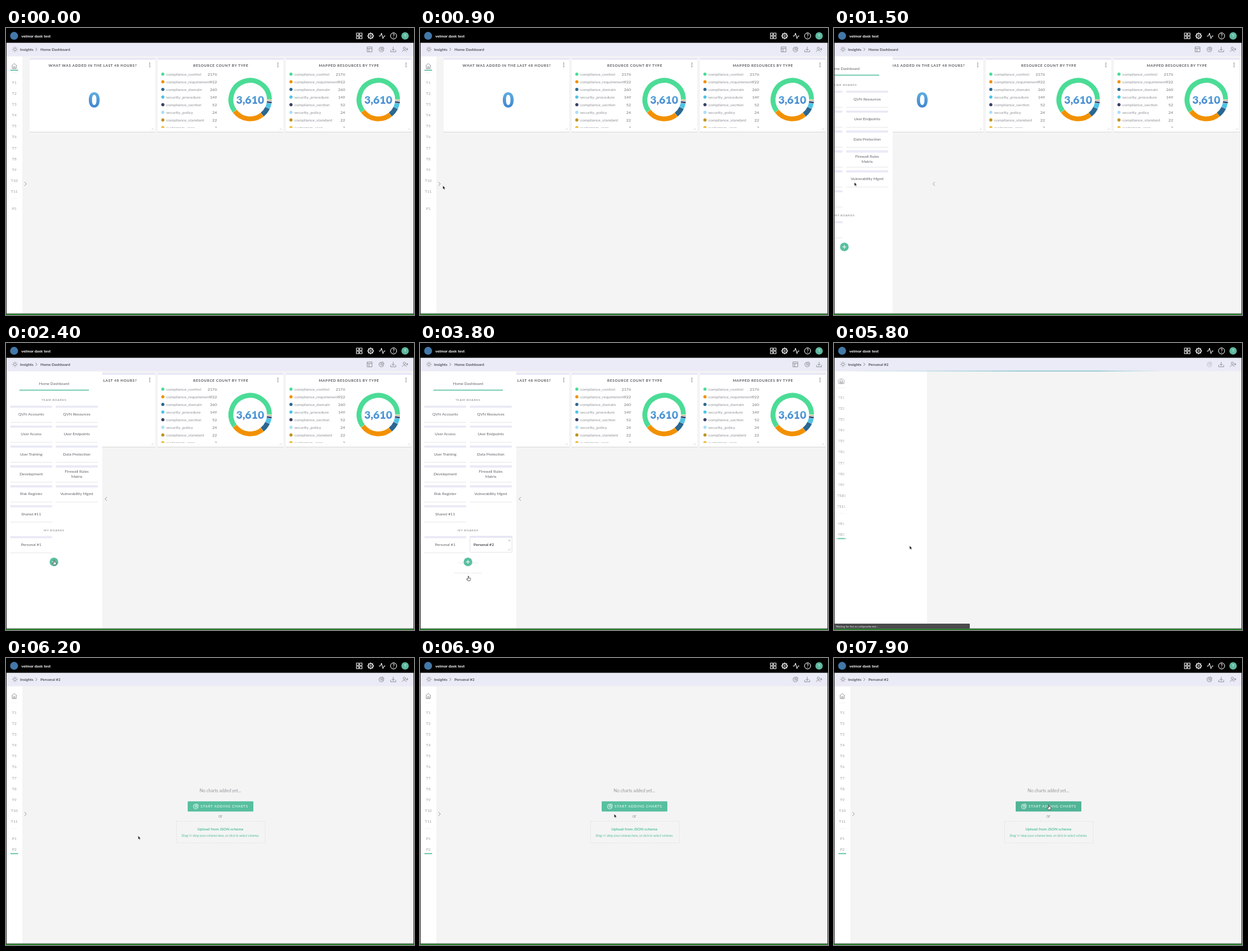
An HTML page that plays this animation: 640 by 451 pixels, repeating every 8000 ms.

```html
<!DOCTYPE html>
<html lang="en">
<head>
<meta charset="utf-8">
<title>Dashboard boards</title>
<style>
html, body { margin: 0; width: 100%; height: 100%; overflow: hidden; background: #f4f4f4; }
svg { display: block; width: 640px; height: 451px; }
text { font-family: Lato, "Open Sans", sans-serif; }
</style>
</head>
<body>
<svg id="stage" viewBox="0 0 640 451" xmlns="http://www.w3.org/2000/svg"></svg>
<script>
const stage = document.getElementById('stage');
const TEAL = '#57bf9f';

// ---- markup helpers ----
const rect = (x, y, w, h, fill, more = '') =>
  `<rect x="${x}" y="${y}" width="${w}" height="${h}" fill="${fill}" ${more}/>`;
const circle = (x, y, r, fill, more = '') =>
  `<circle cx="${x}" cy="${y}" r="${r}" fill="${fill}" ${more}/>`;
const line = (d, color, w = 1, more = '') =>
  `<path d="${d}" fill="none" stroke="${color}" stroke-width="${w}" ${more}/>`;
const text = (x, y, s, size, fill, more = '') =>
  `<text x="${x}" y="${y + size * 0.35}" font-size="${size}" fill="${fill}" ${more}>${s}</text>`;
const mid = (x, y, s, size, fill, more = '') =>
  text(x, y, s, size, fill, 'text-anchor="middle" ' + more);
const group = (id, body, more = '') => `<g id="${id}" ${more}>${body}</g>`;
const BOLD = 'font-weight="700"';

// ---- icons, centred on 0,0 ----
const GREY = '#85858c';
const pieIcon = c => line('M-.8 -3.6A3.8 3.8 0 1 0 3.8 1H-.8Z', c, .8) + line('M1 -4V-.8H4.2A3.4 3.4 0 0 0 1 -4Z', c, .8);
const icons = {
  layout: line('M-3.8 -3.8H3.8V3.8H-3.8ZM-3.8 -1.3H3.8M-1 -1.3V3.8', GREY, .8),
  pie: pieIcon(GREY),
  down: line('M0 -4V1.5M-2.3 -.6L0 1.7L2.3 -.6M-4 1V3.8H4V1', GREY, .8),
  user: circle(-1.2, -1.8, 1.8, 'none', `stroke="${GREY}" stroke-width=".8"`) +
    line('M-4.4 3.8C-4.4 .6 2 .6 2 3.8M3.2 -2.2V1.6M1.4 -.3H5', GREY, .8)
};
const home = line('M-4 -.5L0 -4L4 -.5M-3.2 -1V4H3.2V-1M-1.1 4V1H1.1V4', '#8a8a90', .8);

function rays(n, r1, r2) {
  let d = '';
  for (let i = 0; i < n; i++) {
    const c = Math.cos(i * 2 * Math.PI / n), s = Math.sin(i * 2 * Math.PI / n);
    d += `M${c * r1} ${s * r1}L${c * r2} ${s * r2}`;
  }
  return d;
}

// ---- top bars ----
function header() {
  let s = rect(0, 0, 640, 23.5, '#000') + circle(12.7, 12.3, 6.2, '#4378a8') +
    text(24, 12.3, 'velmor dask test', 6.3, '#fff', BOLD);
  for (const x of [549.7, 554.8]) for (const y of [8, 13.1])
    s += rect(x, y, 3.7, 3.7, 'none', 'stroke="#fff" stroke-width=".9"');
  s += `<g transform="translate(572 12.4)">${circle(0, 0, 3.7, 'none', 'stroke="#fff" stroke-width="1.2"')}` +
    circle(0, 0, 1.4, 'none', 'stroke="#fff" stroke-width=".9"') + line(rays(8, 3.9, 5.1), '#fff', 1.5) + '</g>';
  s += line('M585 12.7H587.2L589 8.2L591.3 16.7L593 12.7H595', '#fff', 1);
  s += circle(608, 12.4, 4.8, 'none', 'stroke="#fff" stroke-width="1"') + mid(608, 12.5, '?', 7, '#fff', BOLD);
  s += circle(626, 12.4, 5.8, '#5fb8a0') + mid(626, 12.4, 'T', 5.5, '#e6fff6');
  s += rect(0, 23.5, 640, 20.8, '#eaebf6');
  s += `<g transform="translate(14 33.5)">${circle(0, 0, 2.1, 'none', 'stroke="#85858c" stroke-width=".8"')}` +
    line(rays(8, 3.2, 4.4), '#85858c', .8) + '</g>';
  s += text(22, 33.6, 'Insights', 6.1, '#55565e', BOLD) + line('M46.3 31.2L48.6 33.6L46.3 36', '#777', .8);
  s += `<text id="crumb" x="54" y="35.7" font-size="6" fill="#55565e" ${BOLD}></text>`;
  for (const k in icons) s += group('icon-' + k, icons[k]);
  return s;
}

// ---- dashboard cards ----
const rows = [
  ['compliance_control', 2176, '#4bdc96'], ['compliance_requirement', 922, '#f29100'],
  ['compliance_domain', 260, '#2b6790'], ['security_procedure', 149, '#4cc3e6'],
  ['compliance_section', 52, '#3a3f66'], ['security_policy', 24, '#a9dff6'],
  ['compliance_standard', 22, '#bd9420'], ['customers_user', 2, '#f0bb38']
];
const total = 3610;

function card(x, title) {
  return rect(x, 47, 197, 4, '#e6e8f7') +
    rect(x, 50, 197, 113, '#fff', 'filter="url(#soft)"') +
    mid(x + 99, 59, title, 5.6, '#55565c', BOLD + ' letter-spacing=".6"') +
    [55.2, 58, 60.8].map(y => circle(x + 188.5, y, .75, '#555')).join('') +
    line(`M${x + 191} 160.5L${x + 194.5} 157M${x + 193} 160.5L${x + 194.5} 159`, '#bbb', .5);
}

function donut(cx, cy) {
  const r = 30.2, at = a => `${cx + r * Math.cos(a)} ${cy - r * Math.sin(a)}`;
  let a = 0, s = '';
  for (const [, n, color] of rows) {
    const b = a + n / total * 2 * Math.PI;
    s += line(`M${at(a)}A${r} ${r} 0 ${b - a > Math.PI ? 1 : 0} 0 ${at(b)}`, color, 7.6);
    s += line(`M${cx + 26.4 * Math.cos(b)} ${cy - 26.4 * Math.sin(b)}L${cx + 34 * Math.cos(b)} ${cy - 34 * Math.sin(b)}`, '#fff', .5);
    a = b;
  }
  return s + mid(cx, cy + .2, '3,610', 17.2, 'url(#blue)', 'font-weight="900"');
}

function chartCard(x, title) {
  const list = rows.map(([name, n, color], i) => {
    const y = 72.5 + 12 * i;
    return circle(x + 8, y, 2.5, color) + text(x + 13.3, y, name, 6.45, '#92939a') +
      text(x + 93, y, n, 6.4, '#74757c', 'text-anchor="end"');
  }).join('');
  return card(x, title) + `<g clip-path="url(#list)">${list}</g>` + donut(x + 145, 112.5);
}

const dashboard = () =>
  card(37, 'WHAT WAS ADDED IN THE LAST 48 HOURS?') +
  mid(138.5, 113.8, '0', 31.5, 'url(#blue)', 'font-weight="900"') +
  chartCard(238, 'RESOURCE COUNT BY TYPE') + chartCard(439, 'MAPPED RESOURCES BY TYPE');

// ---- narrow rail ----
function rail(withNew) {
  let s = `<g transform="translate(13 59.8)">${home}</g>`;
  for (let i = 0; i < 11; i++) s += mid(13, 85.5 + 17.15 * i, 'T' + (i + 1), 6.3, '#a3a3a8');
  s += mid(13, 283.5, 'P1', 6.3, '#a3a3a8');
  s += line('M8 70.5H18M8 268H18', '#ececef', .6);
  if (withNew) s += mid(13, 300.5, 'P2', 6.3, '#a3a3a8');
  return s + rect(7, withNew ? 306.6 : 65.6, 12, 1.6, TEAL);
}

// ---- wide panel ----
const tile = (x, y, label) => {
  const lines = label.split('|');
  return rect(x, y - 13.6, 66, 3.4, '#e9e9f6', 'rx="1"') +
    line(`M${x} ${y + 12.8}H${x + 66}`, '#dedee4', .7) +
    lines.map((l, i) => mid(x + 33, y + (i - (lines.length - 1) / 2) * 8, l, 6.2, '#66676e')).join('');
};
const boards = ['QVN Accounts', 'QVN Resources', 'User Access', 'User Endpoints', 'User Training',
  'Data Protection', 'Development', 'Firewall Rules|Matrix', 'Risk Register', 'Vulnerability Mgmt', 'Shared #11'];

function panel() {
  const caps = 'letter-spacing=".7"';
  let s = rect(-5, 44.3, 156, 405, '#fff');
  s += mid(75.3, 63.6, 'Home Dashboard', 6.2, '#66676e') + rect(21, 73.4, 109, 1.4, TEAL);
  s += mid(75.5, 89.6, 'TEAM BOARDS', 4.5, '#77787e', caps);
  boards.forEach((b, i) => { s += tile(i % 2 ? 78 : 6.5, 112 + 31.3 * (i >> 1), b); });
  s += mid(75.5, 294.6, 'MY BOARDS', 4.5, '#77787e', caps) + tile(6.5, 317, 'Personal #1');
  s += group('newTile', tile(78, 317, 'Personal #2'));
  s += group('editTile',
    rect(78.3, 303.5, 66, 25.5, '#fff', 'stroke="#d9d9e0" stroke-width=".7" rx="1"') +
    rect(78, 303.2, 66.6, 3, '#e6e7f5') + text(84, 316.4, 'Personal #2', 6.1, '#505158', BOLD) +
    line('M138.4 308.6L141.8 312M141.8 308.6L138.4 312M138 324.6L139.4 326L142.2 322.8', '#a5a5ab', .6));
  s += group('menu', mid(75.5, 356, 'TEAM BOARD', 4.6, '#9a9aa0', 'letter-spacing=".3"') +
    mid(75.5, 372, 'PERSONAL BOARD', 4.6, '#9a9aa0', 'letter-spacing=".3"'));
  s += circle(75.2, 344, 6.8, TEAL) + line('M72.2 344H78.2M75.2 341V347', '#fff', 1);
  return s;
}

// ---- blank board ----
const blank = () =>
  mid(336.3, 209, 'No charts added yet...', 6.8, '#96979e') +
  group('button', rect(285, 225.2, 103, 16, TEAL, 'id="face" rx="1"')) +
  `<g transform="translate(297.6 233.2)">${pieIcon('#fff')}</g>` +
  text(305.3, 233.3, 'START ADDING CHARTS', 5.5, '#fff', 'letter-spacing=".68"') +
  mid(336.3, 249, 'or', 6.8, '#96979e') +
  rect(267.5, 256.5, 139, 34, 'none', 'stroke="#d9dadd" stroke-width=".7" stroke-dasharray="2.2 1.8"') +
  mid(336.3, 268.4, 'Upload from JSON schema', 6.05, TEAL, BOLD) +
  mid(336.3, 279, "Drag 'n' drop your schema here, or click to select schema.", 5.2, TEAL, 'font-style="italic"');

const status = () => rect(0, 441, 213, 8, '#4b4b4d', 'rx="1"') +
  text(3, 445, 'Waiting for live.eu.velquorda.test...', 4.4, '#f0f0f0', 'style="font-family:\'Liberation Sans\',sans-serif"');

stage.innerHTML = `<defs>
  <linearGradient id="blue" x1="0" y1="0" x2="0" y2="1"><stop offset=".15" stop-color="#62b0e0"/><stop offset=".85" stop-color="#3f83d0"/></linearGradient>
  <linearGradient id="streak"><stop offset="0" stop-color="#a9d5dc" stop-opacity=".1"/><stop offset=".55" stop-color="#86c3cc"/><stop offset=".8" stop-color="#86c3cc"/><stop offset="1" stop-color="#a9d5dc" stop-opacity=".1"/></linearGradient>
  <filter id="soft" x="-5%" y="-5%" width="110%" height="112%"><feDropShadow dx="0" dy=".6" stdDeviation=".7" flood-opacity=".18"/></filter>
  <clipPath id="list"><rect x="230" y="66" width="410" height="91"/></clipPath>
  <clipPath id="body"><rect x="0" y="44.3" width="640" height="405"/></clipPath></defs>` +
  rect(0, 0, 640, 451, '#f4f4f4') +
  `<g clip-path="url(#body)">` +
  group('cards', dashboard()) + group('blank', blank()) +
  rect(0, 44.3, 25.5, 405, '#fff', 'id="strip"') +
  group('railOld', rail(false)) + group('railGhost', rail(true)) + group('railNew', rail(true)) +
  group('panel', panel()) + '</g>' +
  line('M-1.5 -3L1.5 0L-1.5 3', '#8c8c92', .8, 'id="chevron"') +
  header() + rect(33, 43.4, 477, 1.4, 'url(#streak)', 'id="loader"') +
  rect(0, 23, .9, 427, '#222') + rect(639.2, 23, .8, 427, '#222') +
  rect(0, 448.6, 640, .9, '#1d2a20') + rect(0, 449.4, 640, 1.6, '#177a1c') +
  group('status', status()) +
  group('arrow', '<path d="M0 0V5.6L1.4 4.4L2.3 6.4L3.2 6L2.3 4.1H4Z" fill="#111" stroke="#fff" stroke-width=".4"/>') +
  group('hand', '<path d="M-.6 0Q0 -.7 .6 0V2.6L3 3.2Q3.6 3.5 3.3 4.6L2.6 7.2H-1.2L-2.9 4.5Q-2.9 3.7 -2 4L-.6 4.8Z" fill="#fff" stroke="#111" stroke-width=".6"/>');

const $ = id => document.getElementById(id);
const show = (id, on) => { $(id).style.display = on ? '' : 'none'; };
const move = (id, x, y = 0) => $(id).setAttribute('transform', `translate(${x} ${y})`);
const part = (t, a, b) => Math.min(1, Math.max(0, (t - a) / (b - a)));
const inOut = p => p < .5 ? 2 * p * p : 1 - 2 * (1 - p) * (1 - p);

// time, x, y of the pointer tip
const route = [
  [100, 190, 456], [1000, 32, 242.5], [1800, 32, 242.5], [2300, 75.5, 341.5], [2450, 75.5, 341.5],
  [2700, 76, 366.5], [3900, 76, 366.5], [4500, 140, 323], [4900, 140, 323], [5300, 118.6, 318.6],
  [5800, 118.6, 318.6], [6300, 215, 276], [6600, 304.6, 245.2], [6900, 304.6, 245.2], [7700, 337, 231]
];
function pointer(t) {
  let i = 0;
  while (i < route.length - 1 && route[i + 1][0] <= t) i++;
  const a = route[i], b = route[i + 1] || a;
  const p = inOut(part(t, a[0], b[0] + (a === b ? 1 : 0)));
  return [a[1] + (b[1] - a[1]) * p, a[2] + (b[2] - a[2]) * p];
}

function draw(t) {
  const left = t >= 5500, open = t >= 1350 && t < 5700, closed = t >= 6150;
  const editing = t >= 3700 && !left;

  $('crumb').textContent = left ? 'Personal #2' : 'Home Dashboard';
  show('icon-layout', !left);
  show('icon-user', !editing);
  move('icon-layout', editing ? 588.8 : 570.3, 33.6);
  move('icon-pie', editing ? 607.4 : 588.8, 33.6);
  move('icon-down', editing ? 626 : 607.4, 33.6);
  move('icon-user', 626, 33.6);
  $('icon-pie').style.opacity = left ? .45 + .55 * part(t, 5800, 6100) : 1;

  show('cards', !left);
  show('blank', t >= 6200);
  $('face').setAttribute('fill', t >= 7500 ? '#52b496' : TEAL);

  show('panel', open);
  move('panel', -151 * Math.pow(1 - part(t, 1350, 1750), 2));
  show('newTile', t >= 4800);
  show('editTile', t >= 3500 && t < 4800);
  const fade = part(t, 3550, 3900);
  $('menu').style.opacity = part(t, 2400, 2600) * Math.pow(1 - fade, 1.1);
  move('menu', 0, -11 * part(t, 3550, 3800));

  const closing = inOut(part(t, 5750, 6100));
  $('strip').setAttribute('width', t < 5700 ? 25.5 : 151 - 125.5 * closing);
  show('railOld', t < 1350);
  show('railNew', t >= 5700);
  show('railGhost', t >= 5700 && !closed);
  move('railGhost', -3 * (1 - part(t, 5900, 6100)));
  $('railGhost').style.opacity = .65;
  $('railNew').style.opacity = closed ? 1 : .65;

  show('chevron', !left || closed);
  $('chevron').setAttribute('transform', open ? 'translate(156.8 245) scale(-1 1)' : 'translate(30.5 245)');
  show('loader', left && t < 6200);
  $('loader').setAttribute('x', 33 + (t - 5800) * .4);
  show('status', left && t < 6200);

  const [x, y] = pointer(t);
  const hand = (t >= 2250 && t < 4000) || (t >= 4400 && t < 5600) || t >= 7500;
  show('arrow', t >= 100 && !hand);
  show('hand', hand);
  move('arrow', x, y);
  move('hand', x, y);
}

// the screen refreshes ten times a second
function tick() {
  draw(Math.floor(performance.now() % 8000 / 100) * 100);
  requestAnimationFrame(tick);
}
tick();
</script>
</body>
</html>
```
